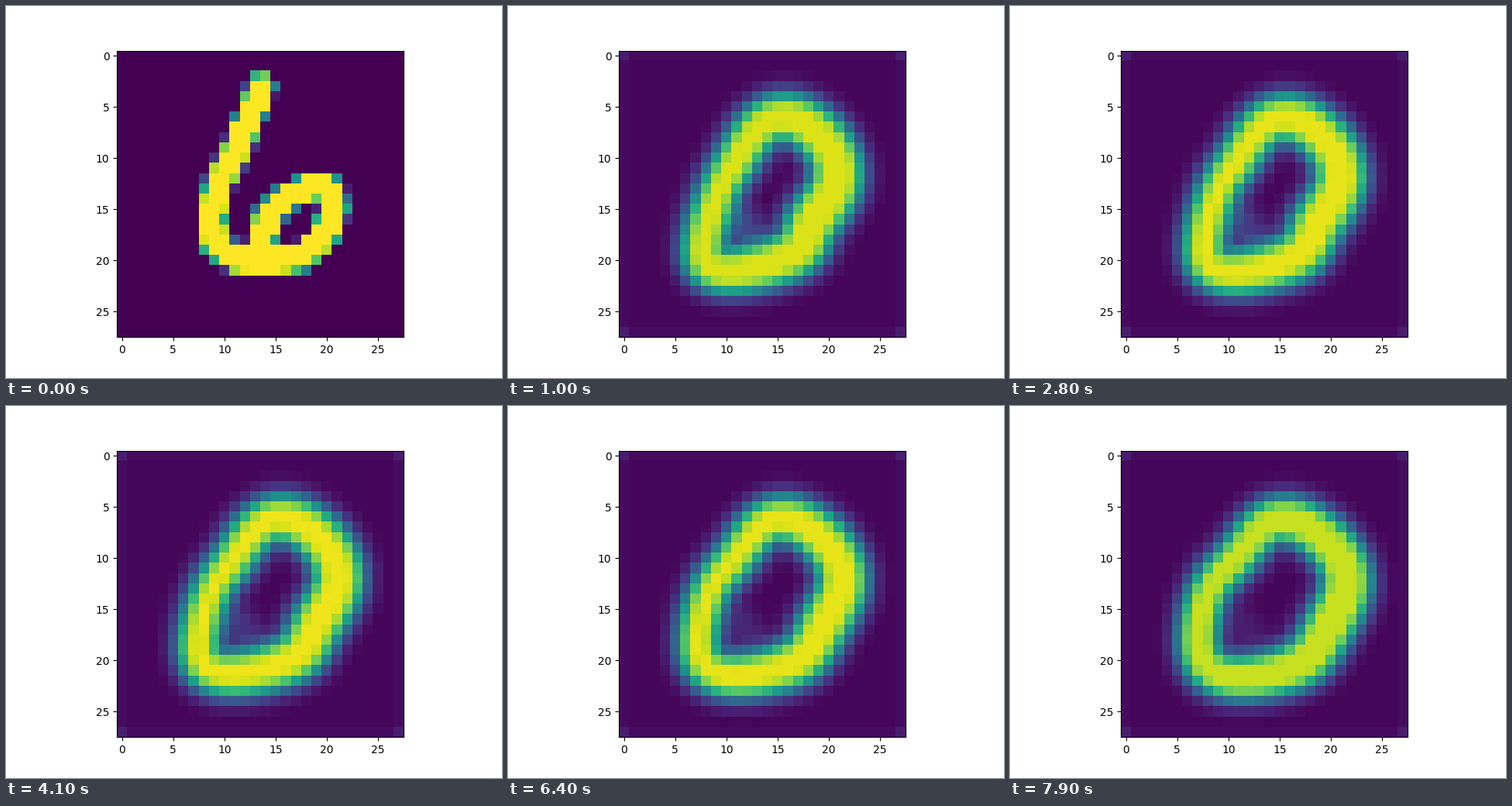
These frames come from a looping animation (640x480 px, 8 s). A matplotlib script:

```python
import numpy as np
import matplotlib.pyplot as plt
from matplotlib.animation import FuncAnimation

SIZE = 28
TICK = 100
TICKS = 80
STEPS = 33
ROWS, COLS = np.mgrid[0:SIZE, 0:SIZE]
CELLS = COLS + 1j * ROWS

# Pen path of the six, as column + row * 1j
SIX_PATH = [13.6 + 3.1j, 12.9 + 5j, 11.3 + 9j, 9.4 + 12.6j, 8.7 + 16j,
            9.2 + 18.6j, 11.2 + 19.9j, 14.5 + 20.1j, 17.5 + 19.7j,
            19.7 + 17.8j, 20.7 + 15j, 20.4 + 13.2j, 18.8 + 12.7j,
            16.2 + 13.8j, 14.3 + 15.6j, 13.5 + 18.6j]

# Ring centre line at the start and end of the drift, clockwise from the right
RING_START = np.array([20 + 14j, 17.8 + 17.8j, 14 + 20.4j, 8 + 20.1j,
                       9 + 14j, 10.7 + 10.7j, 14 + 6.5j, 19.6 + 8.4j])
RING_END = np.array([21.2 + 14j, 18.7 + 18.7j, 14 + 21.4j, 7.7 + 20.3j,
                     7.8 + 14j, 10.4 + 10.4j, 14 + 6.6j, 19.6 + 8.4j])


def depth(path, width):
    """How far each cell lies inside a pen stroke of the given half width."""
    return np.max(width - np.abs(CELLS[..., None] - path), axis=-1)


def polyline(points, samples=400):
    return np.interp(np.linspace(0, len(points) - 1, samples),
                     np.arange(len(points)), points)


def smooth_loop(points, s):
    """Closed curve through the points from their low harmonics."""
    n = len(points)
    k = np.fft.fftfreq(n, 1 / n)
    coef = np.fft.fft(points) / n
    return np.exp(2j * np.pi * np.outer(s, k)) @ coef


def six():
    return np.clip(0.5 + 1.6 * depth(polyline(SIX_PATH), 1.35), 0, 1)


def zero(tick):
    mix = (tick - 10) / 69
    s = np.linspace(0, 1, 160, endpoint=False)
    path = smooth_loop(RING_START + (RING_END - RING_START) * mix, s)
    width = 2.1 - 0.1 * mix - 0.3 * np.cos(2 * np.pi * (s - 0.525))
    ring = 0.53 * (1 + np.tanh(0.8 * depth(path, width)))
    # Faint remains inside the hole fade as it opens
    ring += (0.17 - 0.1 * mix) * np.exp(-(np.abs(CELLS - 12 - 16.5j) / 1.6) ** 2)
    top = np.interp(tick, [1, 55, 79], [0.94, 0.985, 0.915])
    return np.maximum(np.clip(ring, 0.012, top), BORDER)


BORDER = np.zeros((SIZE, SIZE))
BORDER[[0, -1]] = BORDER[:, [0, -1]] = 0.03
BORDER[::SIZE - 1, ::SIZE - 1] = 0.08

SIX = six()
UPDATES = np.round(np.linspace(1, TICKS - 1, STEPS + 1))

fig, ax = plt.subplots(figsize=(6.4, 4.8), dpi=100)
image = ax.imshow(SIX, cmap="viridis", vmin=0, vmax=1)


def update(i):
    past = UPDATES[UPDATES <= i]
    image.set_data(zero(past[-1]) if past.size else SIX)
    return [image]


anim = FuncAnimation(fig, update, frames=TICKS, interval=TICK, repeat=True,
                     repeat_delay=0)
plt.show()
```
